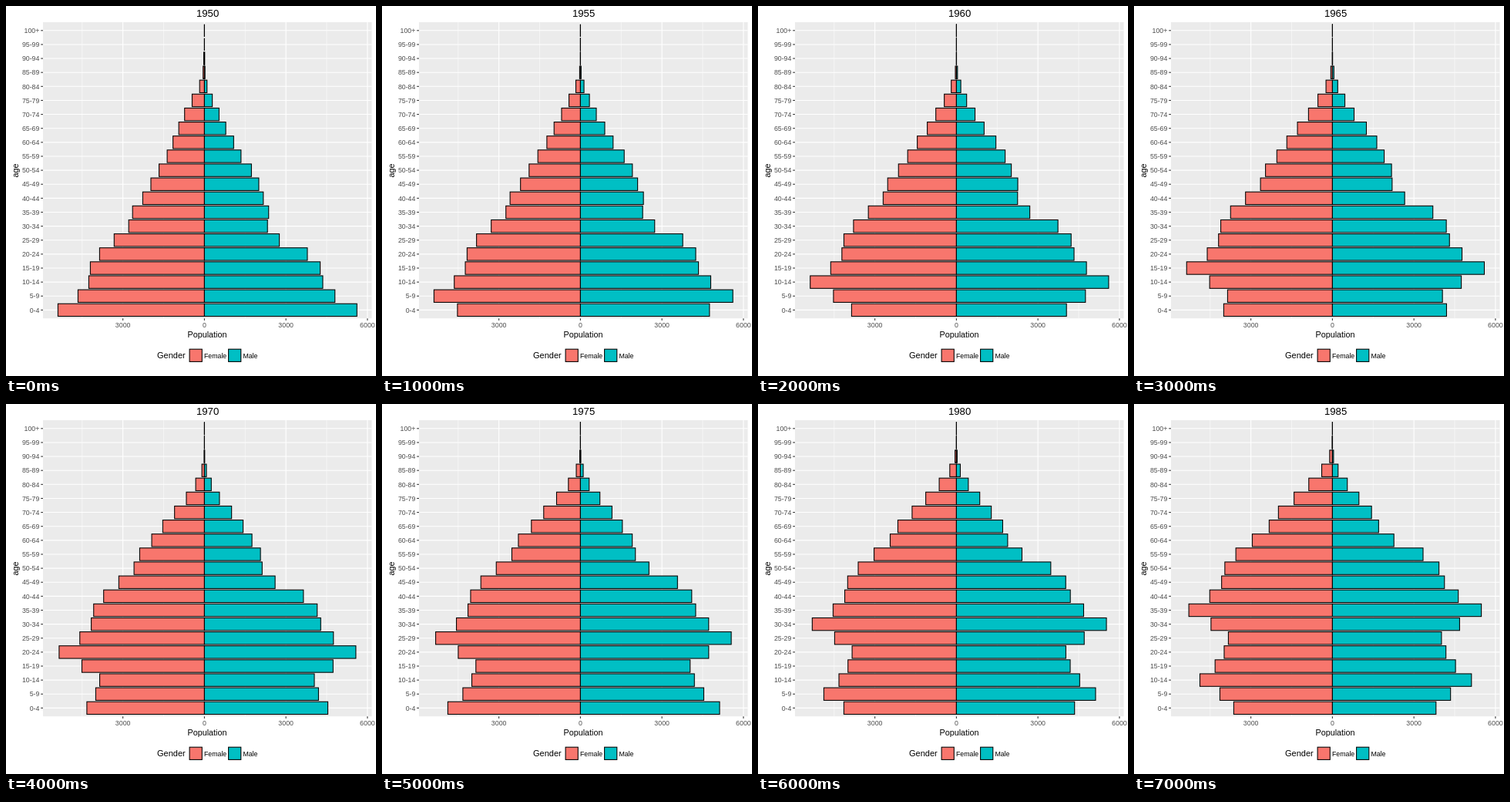
Recreate the animation shown at these times as an HTML page with a canvas. Size 480 by 480 pixels, loop 8 s.

```html
<!DOCTYPE html>
<html lang="en">
<head>
<meta charset="utf-8">
<title>Population pyramid</title>
<style>
html, body { margin: 0; width: 100%; height: 100%; overflow: hidden; background: #fff; }
canvas { display: block; }
</style>
</head>
<body>
<canvas id="chart" width="480" height="480"></canvas>
<script>
const ctx = document.getElementById('chart').getContext('2d');
const PINK = '#F8766D', TEAL = '#00BFC4', GREY = '#4D4D4D';
const STEPS = 8, AGES = 21;
const LEFT = 48, RIGHT = 474.5, TOP = 21, BOTTOM = 405.2;
const ZERO = 257.4, UNIT = 105.75 / 3000, ROW = 18.13;
const rowY = age => 394.4 - age * ROW;

// Key points [cohort, value]; a cohort is its age group at the first step.
const cohortSize = [
  [-7, 128], [-6, 146], [-5, 172], [-4, 152.5], [-3, 141], [-2, 136], [-1, 159.5],
  [0, 190], [1, 164], [2, 150], [3, 148], [4, 136], [6, 98.2], [7, 93.2], [8, 80],
  [11, 48.3], [14, 25.7], [16, 6.2], [17, 1.7], [19, 0]
];
const sexRatio = [
  [-1, 1.05], [3, 1.015], [4, 0.982], [5, 0.83], [6, 0.833],
  [9, 1.016], [10, 1.036], [12, 0.93], [17, 0.45]
];

// Death rate per step: grows with age, falls as time passes.
const female = { base: 0.282, growth: 1.85, decline: 0.8, early: 0.002 };
const male = { base: 0.287, growth: 1.65, decline: 0.91, early: 0.0007 };
const deathRate = (sex, age, step) =>
  sex.decline ** step * (sex.base * sex.growth ** (age - 13) + sex.early * age);

function interpolate(points, x) {
  const next = points.findIndex(point => point[0] >= x);
  if (next < 0) return points.at(-1)[1];
  if (next === 0) return points[0][1];
  const [x0, y0] = points[next - 1], [x1, y1] = points[next];
  return y0 + (y1 - y0) * (x - x0) / (x1 - x0);
}

function barLength(sex, age, step) {
  const cohort = age - step;
  let deaths = 0;
  for (let t = Math.max(0, -cohort); t < step; t++) deaths += deathRate(sex, cohort + t, t);
  const ratio = sex === male ? interpolate(sexRatio, cohort) : 1;
  return interpolate(cohortSize, cohort) * ratio * Math.exp(-deaths);
}

function line(x1, y1, x2, y2, width, color) {
  ctx.lineWidth = width;
  ctx.strokeStyle = color;
  ctx.beginPath();
  ctx.moveTo(x1, y1);
  ctx.lineTo(x2, y2);
  ctx.stroke();
}

function text(label, x, y, size, align = 'center', color = '#000') {
  ctx.font = `${size}px "Liberation Sans", Arial, sans-serif`;
  ctx.textAlign = align;
  ctx.fillStyle = color;
  ctx.fillText(label, x, y);
}

function box(x, y, w, h, fill) {
  ctx.fillStyle = fill;
  ctx.fillRect(x, y, w, h);
  ctx.lineWidth = 1.07;
  ctx.strokeStyle = '#000';
  ctx.strokeRect(x, y, w, h);
}

function drawAxes() {
  ctx.fillStyle = '#EBEBEB';
  ctx.fillRect(LEFT, TOP, RIGHT - LEFT, BOTTOM - TOP);
  for (let value = -4500; value <= 6000; value += 1500) {
    const x = ZERO + value * UNIT, major = value % 3000 === 0;
    line(x, TOP, x, BOTTOM, major ? 1.07 : 0.53, '#fff');
    if (!major) continue;
    line(x, BOTTOM, x, BOTTOM + 2.8, 1.07, '#333');
    text(Math.abs(value), x, 417, 8.8, 'center', GREY);
  }
  for (let age = 0; age < AGES; age++) {
    const y = rowY(age), from = age * 5;
    line(LEFT, y, RIGHT, y, 1.07, '#fff');
    line(LEFT - 2.8, y, LEFT, y, 1.07, '#333');
    text(from < 100 ? `${from}-${from + 4}` : '100+', 43.4, y + 3.2, 8.8, 'right', GREY);
  }
  text('Population', 261, 430, 10.8);
  ctx.save();
  ctx.translate(16, 213.5);
  ctx.rotate(-Math.PI / 2);
  text('age', 0, 0, 10.8);
  ctx.restore();
}

function drawLegend() {
  text('Gender', 196, 457, 11, 'left');
  [['Female', 238.1, PINK], ['Male', 288.6, TEAL]].forEach(([label, x, color]) => {
    box(x, 445.2, 16.2, 16.2, color);
    text(label, x + 18.8, 457, 8.8, 'left');
  });
}

function draw(step) {
  ctx.fillStyle = '#fff';
  ctx.fillRect(0, 0, 480, 480);
  drawAxes();
  for (let age = 0; age < AGES; age++) {
    const y = rowY(age) - ROW * 0.45, left = barLength(female, age, step);
    box(ZERO - left, y, left, ROW * 0.9, PINK);
    box(ZERO, y, barLength(male, age, step), ROW * 0.9, TEAL);
  }
  drawLegend();
  text(1950 + step * 5, 261.6, 14, 13.2);
}

function tick() {
  draw(Math.floor(performance.now() / 1000) % STEPS);
  requestAnimationFrame(tick);
}
tick();
</script>
</body>
</html>
```
